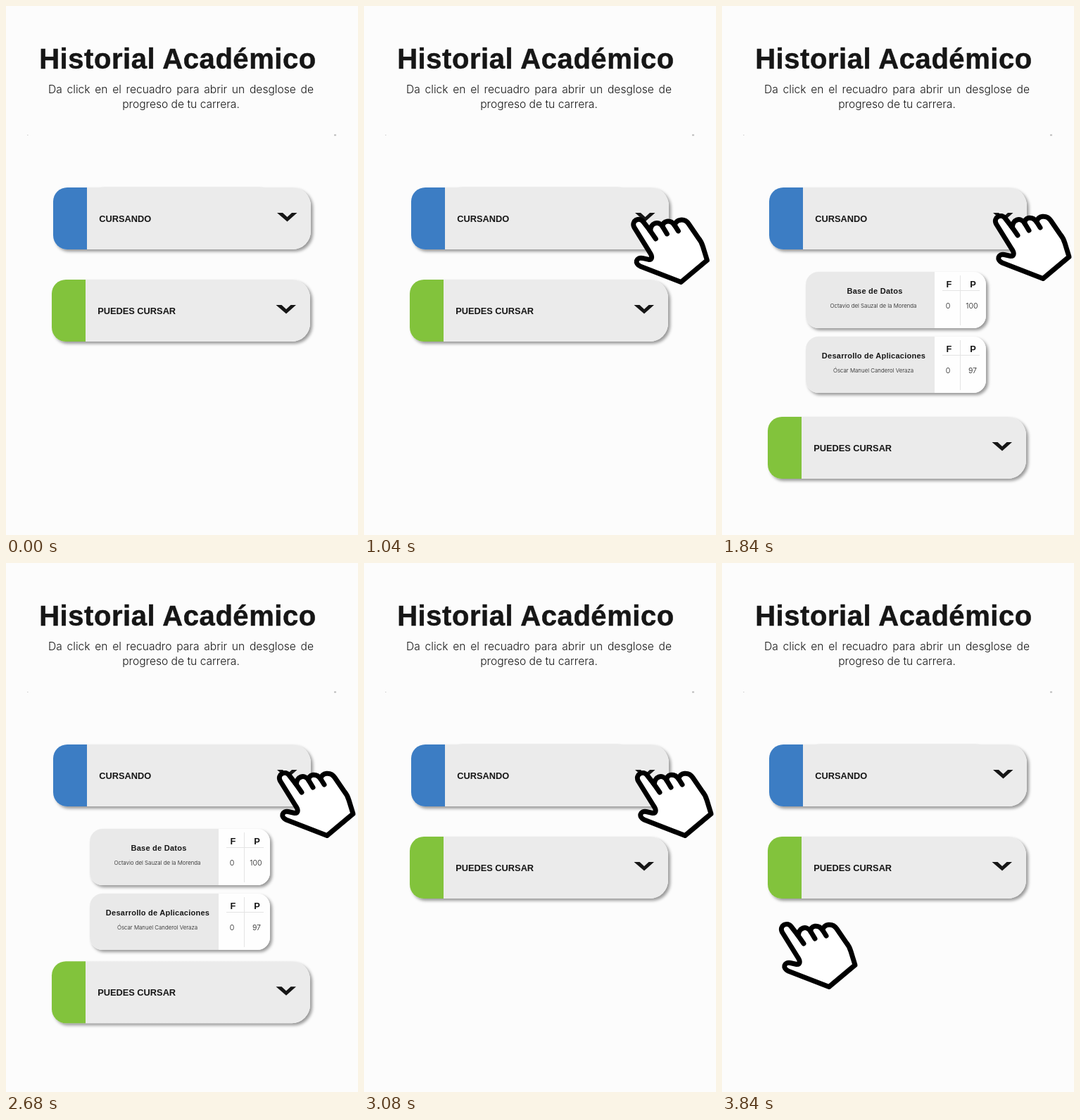
Recreate the animation shown at these times as an HTML page. Size 500 by 752 pixels, loop 4000 ms.

```html
<!DOCTYPE html>
<html lang="es">
<head>
<meta charset="utf-8">
<title>Historial Académico</title>
<style>
  html, body { margin: 0; width: 100%; height: 100%; overflow: hidden; background: #fcfcfc; }
  #stage { position: relative; width: 500px; height: 752px; overflow: hidden; color: #161616; }
  #stage > * { position: absolute; }
  svg { position: absolute; left: 0; top: 0; overflow: visible; fill: #161616; }
  text { font: bold 12.8px "Liberation Sans", Arial, sans-serif; }
  .title { font-size: 40px; letter-spacing: .55px; stroke: #161616; stroke-width: .5px; }
  .intro { left: 60px; top: 108px; width: 377px; font: 300 15.6px/21px Inter, "Liberation Sans", sans-serif; }
  .intro div { text-align: center; white-space: nowrap; }
  .intro .full { text-align: justify; text-align-last: justify; white-space: normal; }
  .panel { height: 88px; border-radius: 20px 26px 26px 20px; box-shadow: 3px 3px 4px rgba(0, 0, 0, .4);
    background: linear-gradient(90deg, var(--tab) 48px, #ebebeb 48px); }
  #current { left: 67px; top: 258px; width: 366px; --tab: #3c7dc4; }
  #available { left: 65px; top: 389px; width: 367px; --tab: #82c33c; }
  .course { left: 119px; width: 256px; height: 80px; border-radius: 18px; box-shadow: 3px 3px 4px rgba(0, 0, 0, .4);
    background: linear-gradient(90deg, #e9e9e9 183px, #fefefe 183px); }
  #first { top: 378px; }
  #second { top: 470px; }
  .course text { text-anchor: middle; }
  .course .name { font-size: 11px; letter-spacing: .25px; }
  .course .teacher, .course .mark { font-family: Inter, "Liberation Sans", sans-serif; font-weight: 300; }
  .course .teacher { font-size: 7.9px; }
  .course .mark { font-size: 10.6px; }
  .rule { stroke: #e4e4e4; fill: none; }
  #hand { left: 385px; top: 295px; width: 112px; height: 97px; }
  #hand path { stroke: #000; stroke-width: 7; stroke-linecap: round; stroke-linejoin: round; }
</style>
</head>
<body>
<div id="stage">
  <svg width="500" height="752">
    <defs>
      <path id="chevron" d="M318 36h8l6.500 6 6.500-6h7.500l-14 12.500z"/>
      <path id="rules" class="rule" d="M219.500 5V76M194 26.500H247"/>
    </defs>
    <text class="title" x="47.200" y="89">Historial Académico</text>
    <rect x="30" y="183" width="1.500" height="1" fill="#ccc"/>
    <rect x="466" y="182.500" width="3" height="2" fill="#bbb"/>
  </svg>
  <div class="intro">
    <div class="full">Da click en el recuadro para abrir un desglose de</div>
    <div>progreso de tu carrera.</div>
  </div>

  <div id="first" class="course"><svg width="256" height="80">
    <use href="#rules"/>
    <text class="name" x="98" y="31">Base de Datos</text>
    <text class="teacher" x="96" y="51">Octavio del Sauzal de la Morenda</text>
    <text x="203.500" y="22">F</text><text x="237.500" y="22">P</text>
    <text class="mark" x="202" y="52">0</text><text class="mark" x="236" y="52">100</text>
  </svg></div>
  <div id="second" class="course"><svg width="256" height="80">
    <use href="#rules"/>
    <text class="name" x="96.500" y="31">Desarrollo de Aplicaciones</text>
    <text class="teacher" x="96" y="51">Óscar Manuel Canderol Veraza</text>
    <text x="203.500" y="22">F</text><text x="237.500" y="22">P</text>
    <text class="mark" x="202" y="52">0</text><text class="mark" x="237" y="52">97</text>
  </svg></div>

  <div id="available" class="panel"><svg width="367" height="88">
    <text x="65.200" y="48.500">PUEDES CURSAR</text><use href="#chevron" x=".5"/>
  </svg></div>
  <div id="current" class="panel"><svg width="366" height="88">
    <text x="65.200" y="48.500">CURSANDO</text><use href="#chevron"/>
  </svg></div>

  <div id="hand"><svg width="112" height="97">
    <path fill="#fff" d="M26 49.500L4.600 15C-.500 5.500 11.500-1 17.400 7L27.500 20C27 9 39 4 45 14C44 5 56 3 62 12
      C63 3 76 1 82 10L95 29Q100 35 102 42L108 61.500L71 92.500L13 70C4.500 66 7 57 16 58.500L25 60.500C31 61 30 55 26 49.500Z"/>
    <path fill="none" d="M26 18L35 31M45 14L51 24M62 12L67 20"/>
  </svg></div>
</div>
<script>
  const LOOP = 4000, STEP = 40;
  const byId = id => document.getElementById(id);
  const hand = byId("hand"), available = byId("available");
  const first = byId("first"), second = byId("second");

  // Cubic Bézier easing with control points (x1, 0) and (x2, 1).
  const bezier = (x1, x2) => p => {
    let lo = 0, hi = 1;
    for (let i = 0; i < 24; i++) {
      const u = (lo + hi) / 2, v = 1 - u;
      if (3 * x1 * u * v * v + 3 * x2 * u * u * v + u ** 3 < p) lo = u; else hi = u;
    }
    return lo * lo * (3 - 2 * lo);
  };
  const easeOut = bezier(0, .58), easeInOut = bezier(.42, .58);

  const tween = (t, start, length, ease) =>
    t <= start ? 0 : t >= start + length ? 1 : ease((t - start) / length);
  const move = (el, x, y) => { el.style.transform = `translate(${x}px, ${y}px)`; };

  function render(t) {
    const enter = 1 - tween(t, 560, 560, easeOut);
    const leave = tween(t, 3290, 550, easeOut);
    hand.style.visibility = t < 560 ? "hidden" : "visible";
    move(hand, -168 * enter - 304 * leave, 148 * enter + 215 * leave);

    const drop = tween(t, 1392, 440, easeOut) - tween(t, 2656, 430, easeOut);
    move(available, 0, 195 * drop);

    const tucked = 1 - tween(t, 1392, 440, easeInOut) + tween(t, 2680, 400, easeInOut);
    move(first, 0, -120 * tucked);
    move(second, 0, -212 * tucked);
  }

  // The picture advances at 25 steps per second.
  const origin = performance.now();
  function tick() {
    const elapsed = performance.now() - origin + 1;
    render(Math.floor(elapsed % LOOP / STEP) * STEP);
    requestAnimationFrame(tick);
  }
  tick();
</script>
</body>
</html>
```
